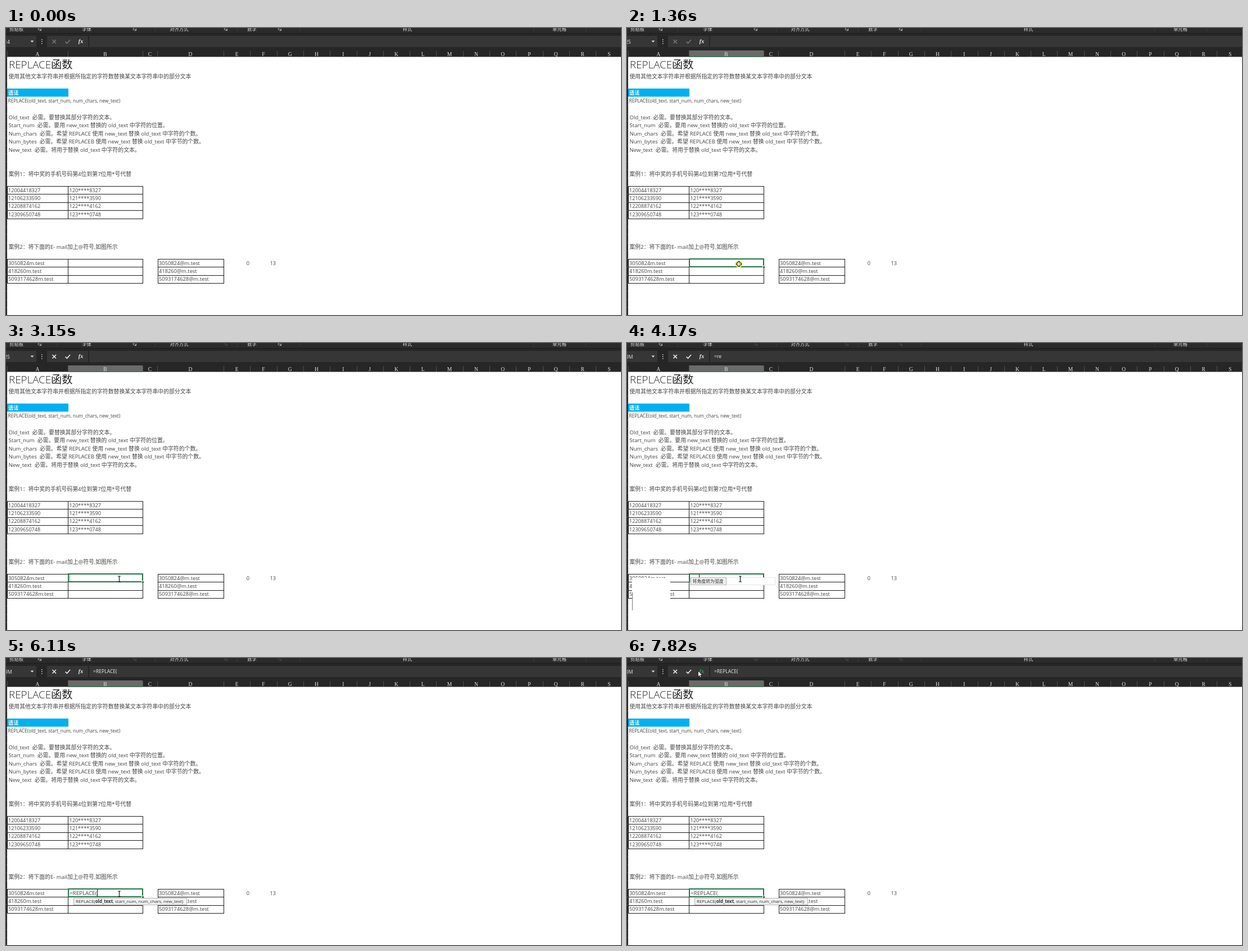
An HTML page with a canvas for the animation above (8000 ms loop, 1094 px wide and 512 px high).

```html
<!DOCTYPE html>
<html lang="zh-CN">
<head>
<meta charset="utf-8">
<style>
html, body { margin: 0; width: 100%; height: 100%; overflow: hidden; background: #fff; }
canvas { display: block; }
</style>
</head>
<body>
<canvas id="stage" width="1094" height="512"></canvas>
<script>
const g = document.getElementById('stage').getContext('2d');
const LOOP = 8000;
const INK = '#444', GREEN = '#217346';

const box = (x, y, w, h, color) => { g.fillStyle = color; g.fillRect(x, y, w, h); };

function frame(x, y, w, h, fill, stroke) {
  box(x, y, w, h, fill);
  g.strokeStyle = stroke;
  g.lineWidth = 1;
  g.strokeRect(x + .5, y + .5, w - 1, h - 1);
}

function line(points, color, width = 1) {
  g.strokeStyle = color;
  g.lineWidth = width;
  g.beginPath();
  points.forEach(([x, y]) => g.lineTo(x, y));
  g.stroke();
}

// Latin and Chinese runs get their own size; returns the end of the text.
function text(str, x, y, { latin = 9.6, cjk = 9.85, color = INK, weight = 400, align = 'left' } = {}) {
  const runs = str.match(/[\u2e80-\uffef]+|[^\u2e80-\uffef]+/g).map(s => {
    const font = s.charCodeAt(0) >= 0x2e80
      ? `${weight} ${cjk}px "Noto Sans CJK SC", "Noto Sans CJK", sans-serif`
      : `${weight} ${latin}px "Open Sans", "Noto Sans", sans-serif`;
    g.font = font;
    return { s, font, w: g.measureText(s).width };
  });
  const total = runs.reduce((sum, r) => sum + r.w, 0);
  x -= align === 'right' ? total : align === 'center' ? total / 2 : 0;
  g.fillStyle = color;
  g.textAlign = 'left';
  for (const r of runs) {
    g.font = r.font;
    g.fillText(r.s, x, y);
    x += r.w;
  }
  return x;
}

const phones = ['12004418327', '12106233590', '12208874162', '12309650748'];
const mails = [['3050824', 'm.test'], ['418260', 'm.test'], ['5093174628', 'm.test']];
const groups = [['剪贴板', 18.5], ['字体', 143.5], ['对齐方式', 308], ['数字', 437.5], ['样式', 714], ['单元格', 984.5]];
const edges = [2, 110, 243, 269, 387];
for (let i = 1; i < 16; i++) edges.push(387 + 47.3 * i);

function fx(x, y, size, color) {
  g.font = `italic 700 ${size}px "Liberation Serif", serif`;
  g.fillStyle = color;
  g.textAlign = 'center';
  g.fillText('fx', x, y);
}

function toolbar(t) {
  box(0, 0, 1094, 51.5, '#262626');
  box(0, 0, 1094, 9, '#2b2b2b');
  box(0, 9, 1094, 1, '#1c1c1c');
  for (const [name, x] of groups) text(name, x, 4.5, { cjk: 8.3, color: '#ddd', align: 'center' });
  for (const x of [60, 229, 391, 487]) {
    const dim = (x === 391 && t >= 1520) || (x > 200 && t >= 3630);
    const c = dim ? '#484848' : '#b0b0b0';
    line([[x - 2.5, 4], [x - 2.5, -.5], [x + 2, -.5]], c);
    line([[x - 1, 1], [x + 2, 4]], c);
    line([[x + 2.5, 1], [x + 2.5, 4.5], [x - 1, 4.5]], c);
  }
  for (const x of [90, 265, 411, 523, 938, 1031]) box(x, 0, 1, 6, '#3a3a3a');

  box(0, 14, 54, 20, '#363636');
  box(73, 14, 73, 20, '#363636');
  box(148, 14, 946, 20, '#363636');
  const [name, right] = t < 980 ? ['L14', 7] : t < 3630 ? ['B25', 7] : ['SUM', 10.5];
  text(name, right, 27.5, { latin: 8.6, color: '#eee', align: 'right' });
  g.fillStyle = '#ddd';
  g.beginPath();
  g.moveTo(43.5, 22.5); g.lineTo(49.5, 22.5); g.lineTo(46.5, 25.7);
  g.fill();
  for (const y of [20, 23.5, 27]) box(63, y, 1.5, 1.5, '#ddd');
  const active = t >= 1520 ? '#f0f0f0' : '#777';
  line([[82.5, 21], [89, 27.5]], active, 1.6);
  line([[89, 21], [82.5, 27.5]], active, 1.6);
  line([[105.5, 24.5], [108.5, 27.3], [114, 21]], active, 1.6);
  fx(133, 27, 10, t >= 7660 ? '#3a9a5c' : '#eee');
  const typed = formula(t);
  if (typed) text(typed, 155, 27, { latin: 8.6, color: '#eee' });
}

function headers(t) {
  if (t >= 760) {
    box(110, 40, 133, 11.5, '#6a6a6a');
    box(110, 50.5, 133, 1, GREEN);
  }
  edges.forEach((x, i) => {
    box(Math.round(x), 41, 1, 10, '#505050');
    if (i === 19) return;
    g.font = '9.5px "Liberation Serif", serif';
    g.fillStyle = '#e4e4e4';
    g.textAlign = 'center';
    g.fillText(String.fromCharCode(65 + i), (x + (edges[i + 1] ?? x + 47.3)) / 2, 50);
  });
}

function grid(x, right, y, rows, split) {
  for (let i = 0; i <= rows; i++) box(x, Math.round(y + i * 14.4), right - x + 1, 1, '#1a1a1a');
  for (const v of [x, split, right]) if (v) box(v, y, 1, Math.round(14.4 * rows) + 1, '#1a1a1a');
}

function sheet() {
  box(0, 51, 1094, 461, '#fff');
  box(0, 51, 2, 461, '#262626');
  for (let y = 94; y < 512; y += 14.43) box(0, Math.round(y), 2, 1, '#505050');
  text('REPLACE函数', 5, 72, { latin: 18.8, cjk: 19.2, weight: 300, color: '#222' });
  text('使用其他文本字符串并根据所指定的字符数替换某文本字符串中的部分文本', 4.5, 90);
  box(2, 108, 109, 14.5, '#00b0f0');
  text('语法', 4, 119, { cjk: 9.2, color: '#fff', weight: 700 });
  text('REPLACE(old_text, start_num, num_chars, new_text)', 3.5, 133, { latin: 8.35 });
  [
    'Old_text  必需。要替换其部分字符的文本。',
    'Start_num  必需。要用 new_text 替换的 old_text 中字符的位置。',
    'Num_chars  必需。希望 REPLACE 使用 new_text 替换 old_text 中字符的个数。',
    'Num_bytes  必需。希望 REPLACEB 使用 new_text 替换 old_text 中字节的个数。',
    'New_text  必需。将用于替换 old_text 中字符的文本。'
  ].forEach((s, i) => text(s, 4.5, 163 + i * 14.4));
  text('案例1：将中奖的手机号码第4位到第7位用*号代替', 4.5, 264);
  text('案例2：将下面的E- mail加上@符号,如图所示', 4.5, 394);

  grid(2, 243, 282, 4, 110);
  phones.forEach((p, i) => {
    const y = 292.5 + i * 14.4;
    text(p, 4, y, { latin: 9.1 });
    text(p.slice(0, 3) + '****' + p.slice(7), 112.5, y, { latin: 9.1 });
  });
  grid(2, 243, 412, 3, 110);
  grid(270, 387, 412, 3);
  mails.forEach(([user, host], i) => {
    const y = 422.5 + i * 14.4;
    text(user + host, 4, y, { latin: 9.3 });
    text(user + '@' + host, 272, y, { latin: 9.3 });
  });
  text('0', 433, 422.5, { latin: 9.1, align: 'right' });
  text('13', 480, 422.5, { latin: 9.1, align: 'right' });
}

const formula = t => t < 3630 ? '' : t < 4010 ? '=' : t < 4090 ? '=r' : t < 6110 ? '=re' : '=REPLACE(';

// The caret fades for one step, then stays hidden until the next blink.
function caretAlpha(t) {
  const start = [6110, 4090, 3630, 1520].find(s => t >= s);
  const p = (t - start) % 1090;
  return p < 530 ? 1 : p < 620 ? .4 : p < 1060 ? 0 : .5;
}

function editor(t) {
  if (t < 760) return;
  g.strokeStyle = GREEN;
  g.lineWidth = 2;
  g.strokeRect(111, 412, 132, 14);
  box(241, 424, 4, 4, '#fff');
  box(242, 425, 3, 3, GREEN);
  if (t < 1520) return;
  const typed = formula(t);
  const end = typed ? text(typed, 113, 422.5, { latin: 9.8 }) : 113;
  g.globalAlpha = caretAlpha(t);
  box(Math.round(end), 413, 1, 12, '#000');
  g.globalAlpha = 1;
}

function tip(str, x, y, w, pad = 4) {
  frame(x, y, w, 14, '#f1f1f1', '#b4b4b4');
  text(str, x + pad, y + 10, { cjk: 7.9, color: '#333' });
}

function popup(t) {
  if (t < 4170) return;
  if (t < 4250) {
    box(9, 419, 68, 58, '#fff');
    box(9, 445, 1, 32, '#777');
    frame(112, 418, 152, 14, '#fff', '#e4e4e4');
    tip('将角度转为弧度', 113, 418, 64, 3.5);
  } else if (t < 6110) {
    const picked = t < 5800 ? 0 : 1;
    frame(120, 429, 69, 58, '#fff', '#8a8a8a');
    ['RECEIVED', 'REPLACE', 'REPLACEB', 'REPT'].forEach((name, i) => {
      const y = 436.3 + i * 14.4;
      if (i === picked) box(133, y - 7, 55, 14, '#0078d7');
      g.strokeStyle = '#444';
      g.lineWidth = 1;
      g.beginPath();
      g.arc(128, y, 4.8, 0, 7);
      g.stroke();
      fx(128, y + 2.4, 8, '#333');
      text(name, 135, y + 3, { latin: 7.9, color: i === picked ? '#fff' : '#111' });
    });
    if (picked) tip('将一个字符串中的部分字符用另一个字符串替换', 191, 443, 175);
    else tip('返回完全投资型债券在到期日收回的金额', 191, 428, 151);
  } else {
    frame(120, 428, 202, 13, '#f1f1f1', '#b4b4b4');
    const hint = { latin: 7.9, color: '#333' };
    let x = text('REPLACE(', 124, 437, hint);
    x = text('old_text', x, 437, { ...hint, weight: 700 });
    text(', start_num, num_chars, new_text)', x, 437, hint);
  }
}

// Stops of the mouse: time, x, y.
const path = [
  [120, 405, 487], [520, 199, 421], [1520, 199, 421], [1521, 201.5, 421], [6430, 201.5, 421],
  [6570, 202, 406], [6740, 204, 404], [6980, 234, 300], [7260, 170, 110], [7500, 85, 22],
  [7580, 88, 22], [7660, 127, 24], [7820, 126.5, 23]
];

function mouseAt(t) {
  const i = path.findIndex(p => p[0] > t);
  if (i < 0) return path[path.length - 1].slice(1);
  const [a, b] = [path[i - 1], path[i]];
  const k = (t - a[0]) / (b[0] - a[0]);
  return [a[1] + (b[1] - a[1]) * k, a[2] + (b[2] - a[2]) * k];
}

function mouse(t) {
  if (t < 120) return;
  const moving = t < 520 || (t >= 6740 && t < 7500);
  const [x, y] = mouseAt(moving ? 120 + Math.floor((t - 120) / 80) * 80 : t);
  if ((t >= 760 && t < 1060) || (t >= 1200 && t < 1500)) {
    g.fillStyle = '#ffff3c';
    g.beginPath();
    g.arc(x, y, 6.3, 0, 7);
    g.fill();
  }
  g.save();
  g.translate(x, y);
  if (y < 51) {
    g.beginPath();
    [[0, 0], [0, 10.5], [2.4, 8.3], [4, 12], [5.7, 11.2], [4.1, 7.7], [7.4, 7.5]].forEach(p => g.lineTo(...p));
    g.closePath();
    g.fillStyle = '#fff';
    g.strokeStyle = '#000';
    g.lineWidth = .7;
    g.fill();
    g.stroke();
  } else if (t >= 1520 && t < 6500) {
    line([[0, -5], [0, 5]], '#111', 1.2);
    line([[-2.5, -5], [2.5, -5]], '#111');
    line([[-2.5, 5], [2.5, 5]], '#111');
  } else {
    box(-5, -2, 10, 4, '#111');
    box(-2, -5, 4, 10, '#111');
    box(-4, -1, 8, 2, '#fff');
    box(-1, -4, 2, 8, '#fff');
  }
  g.restore();
}

function draw(now) {
  const t = now % LOOP;
  sheet();
  toolbar(t);
  headers(t);
  editor(t);
  popup(t);
  mouse(t);
  requestAnimationFrame(draw);
}
requestAnimationFrame(draw);
</script>
</body>
</html>
```
